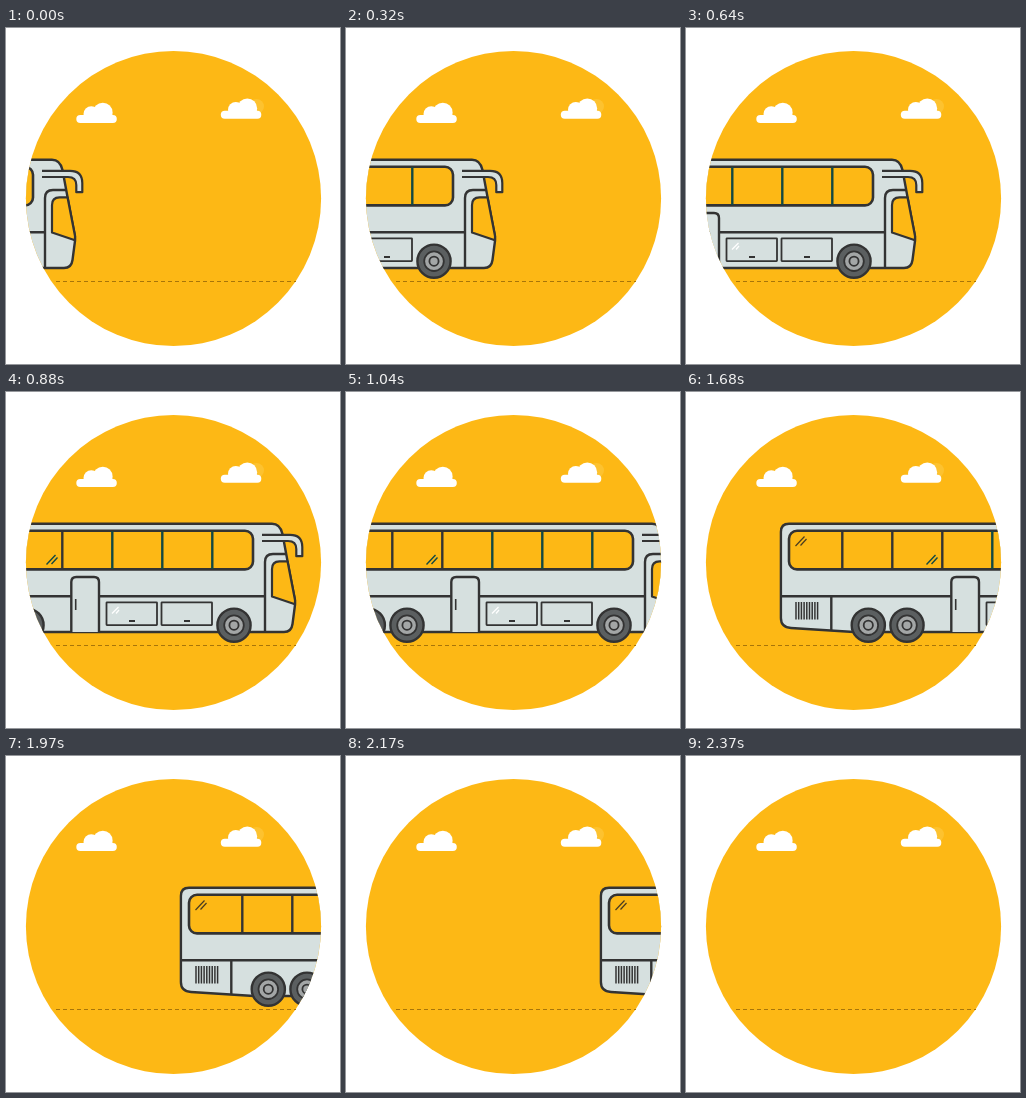
An HTML page with a canvas that plays this animation: 334 by 336 pixels, repeating every 2420 ms.

```html
<!DOCTYPE html>
<html lang="en">
<head>
<meta charset="utf-8">
<title>Passing coach</title>
<style>
html, body { margin: 0; width: 100%; height: 100%; overflow: hidden; background: #fff; }
canvas { display: block; }
</style>
</head>
<body>
<canvas id="stage" width="334" height="336"></canvas>
<script>
const ctx = document.getElementById('stage').getContext('2d');
const LOOP = 2420, SLOW_STEPS = 24, SLOW = 80, FAST = 50;
const STRIDE = 20, START_X = -326;
const ORANGE = '#fdb815', BODY = '#d6e0df', INK = '#333333', TEAL = '#124843';

function paint(path, fill, stroke, width = 2.4) {
  if (fill) { ctx.fillStyle = fill; ctx.fill(path); }
  if (stroke) { ctx.strokeStyle = stroke; ctx.lineWidth = width; ctx.stroke(path); }
}
function shape(d, fill, stroke, width) {
  paint(new Path2D(d), fill, stroke, width);
}
function line(x1, y1, x2, y2, color = INK, width = 2.4) {
  shape(`M${x1} ${y1}L${x2} ${y2}`, null, color, width);
}
function disc(x, y, r, fill, stroke, width) {
  const p = new Path2D();
  p.arc(x, y, r, 0, Math.PI * 2);
  paint(p, fill, stroke, width);
}
function box(x, y, w, h, r, fill, stroke, width) {
  const p = new Path2D();
  p.roundRect(x, y, w, h, r);
  paint(p, fill, stroke, width);
}

function cloud(x, y) {
  box(x, y, 40.5, 8, 4, '#fff');
  disc(x + 15, y - 1, 7.8, '#fff');
  disc(x + 26.5, y - 2.5, 9.8, '#fff');
  box(x + 8, y - 3, 28, 8, 2, '#fff');
}

function wheel(x) {
  disc(x, 233.2, 16.6, '#5b5f60', INK, 2.4);
  disc(x, 233.2, 9.8, '#a3a6a6', INK, 1.8);
  disc(x, 233.2, 4.6, '#a3a6a6', INK, 1.8);
}

function glint(x, y, color, width) {
  line(x, y, x + 9, y - 9.5, color, width);
  line(x + 5, y - 0.5, x + 11, y - 7, color, width);
}

function sideWindows() {
  box(9, 138.8, 344, 38.6, 8, ORANGE, INK, 2.6);
  for (let i = 0; i < 6; i++) {
    const x = 62.3 + i * 50;
    line(x, 139, x, 177, i < 3 ? INK : TEAL);
  }
  glint(15.5, 154, '#4a3c20', 1.2);
  glint(146.5, 172.5, TEAL, 1.4);
}

function lowerPanels() {
  line(1, 204.2, 365, 204.2);
  line(51.3, 204, 51.3, 238);
  for (let i = 0; i < 9; i++) {
    const x = 16 + i * 2.7;
    line(x, 210, x, 227.5, INK, 1.5);
  }
  shape('M171.3 240V190Q171.3 185 176.3 185H194Q199 185 199 190V240', BODY, INK, 2.4);
  line(175.7, 207, 175.7, 218, INK, 1.6);
  for (const x of [206.5, 261.5]) {
    box(x, 210.3, 50.5, 22.8, 0.5, null, INK, 1.8);
    line(x + 22.5, 229, x + 28.5, 229, INK, 2);
  }
  line(212, 221.5, 218.5, 215, '#fff', 1.2);
  line(216, 221.5, 219, 218, '#fff', 1.2);
}

function cab() {
  shape('M365 240V170Q365 162 373 162H386', null, INK);
  shape('M372 204.5V177Q372 169.3 379.5 169.3H387.5L395 208V212.3Z', ORANGE, INK, 2.2);
  shape('M362 142.8H390Q402.3 142.8 402.3 155V164.2H396.3V157Q396.3 149 388 149H362', BODY, INK, 2.2);
}

function bus() {
  shape('M0.9 140Q0.9 131.8 9 131.8H372Q380 131.8 382.5 142L387.5 169L395 208V213' +
    'L392.5 232Q391.5 240 384 240H74L11 236Q0.9 235.3 0.9 226Z', BODY, INK, 2.4);
  sideWindows();
  lowerPanels();
  cab();
  [88.3, 127, 334].forEach(wheel);
}

function draw(time) {
  const slowSpan = SLOW_STEPS * SLOW;
  const step = time < slowSpan
    ? Math.floor(time / SLOW)
    : SLOW_STEPS + Math.floor((time - slowSpan) / FAST);

  ctx.fillStyle = '#fff';
  ctx.fillRect(0, 0, 334, 336);
  disc(167.5, 170.5, 147.6, ORANGE);
  disc(250.5, 78.5, 7.5, '#fdc22f');
  cloud(70.3, 87);
  cloud(214.8, 82.8);
  ctx.setLineDash([4, 3]);
  line(50, 253.5, 290, 253.5, '#a87509', 1);
  ctx.setLineDash([]);

  ctx.save();
  ctx.beginPath();
  ctx.arc(167.5, 170.5, 147.6, 0, Math.PI * 2);
  ctx.clip();
  ctx.translate(START_X + step * STRIDE, 0);
  ctx.lineJoin = 'round';
  bus();
  ctx.restore();
}

function tick() {
  draw(performance.now() % LOOP);
  requestAnimationFrame(tick);
}
tick();
</script>
</body>
</html>
```
